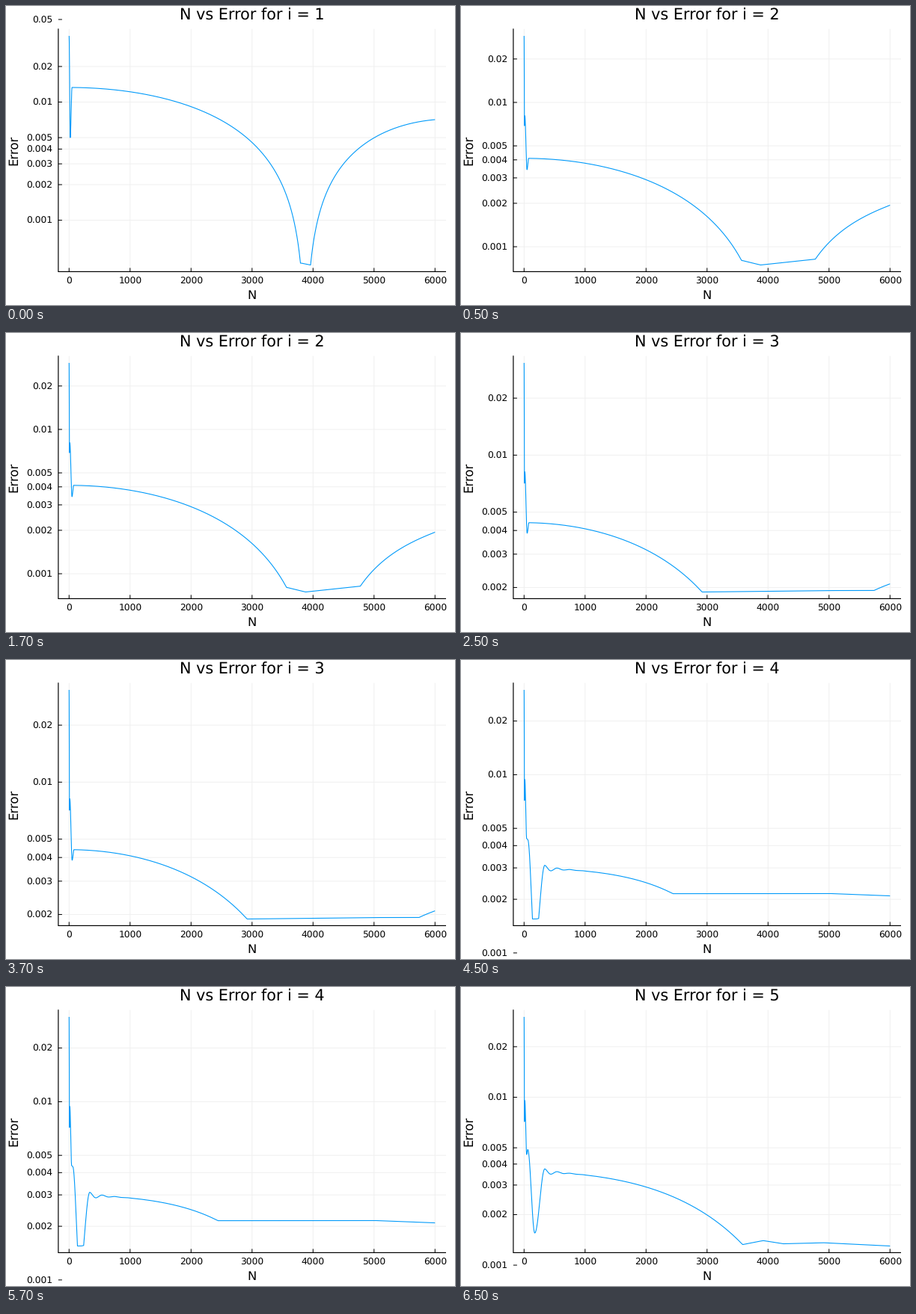
Animation, 600 px wide and 400 px high, one loop 8000 ms. Source, as a matplotlib script:

```python
import matplotlib.pyplot as plt
import numpy as np
from matplotlib.animation import FuncAnimation

WIDTH, HEIGHT, DPI = 600, 400, 100
LEFT, RIGHT, TOP, BOTTOM = 69.9, 588, 30.8, 355.4
X_ZERO, X_SCALE = 84.3, 0.0815
Y_MAX, Y_MIN = 40, 346.5  # heights of the largest and smallest error
TICK = 5
TICK_VALUES = (0.001, 0.002, 0.003, 0.004, 0.005, 0.01, 0.02, 0.05)
BLUE, GRID = "#009afa", "#f0f0f0"

plt.rcParams["font.family"] = "DejaVu Sans"
plt.rcParams["text.hinting"] = "none"

# Key points are (N, error in thousandths):
#   start  - turning points before the curve settles at N = settle
#   trend  - signed error, crossing zero where the curve dips
#   floor  - lower bound that cuts the dip off
SCENES = (
    dict(start=[(0, 36.3), (19, 5)], settle=48, ripple=0,
         trend=[(0, 13.29), (1500, 10.91), (3000, 4.55), (4500, -3), (6000, -7.1)],
         floor=[(3808, 0.433), (3975, 0.416)]),
    dict(start=[(0, 28.9), (6, 6.9), (12, 8.07), (48, 3.42)], settle=75, ripple=0,
         trend=[(0, 4.1), (1500, 3.416), (3000, 1.62), (5000, -1.07), (6000, -1.94)],
         floor=[(3580, 0.802), (3875, 0.747), (4780, 0.819)]),
    dict(start=[(0, 30.7), (6, 7.11), (12, 8.15), (50, 3.87)], settle=80, ripple=0,
         trend=[(0, 4.4), (2000, 3.165), (2920, 1.89), (5740, -1.93), (6000, -2.09)],
         floor=[(2920, 1.893), (5000, 1.927)]),
    dict(start=[(0, 29.9), (6, 7.17), (12, 9.39), (42, 4.38), (60, 4.32), (175, 1.12)],
         settle=340, ripple=0.045,
         trend=[(0, 2.98), (1500, 2.73), (2440, 2.15), (6000, -1)],
         floor=[(200, 1.55), (2440, 2.15), (5000, 2.155), (6000, 2.09)]),
    dict(start=[(0, 30.1), (6, 7.16), (12, 9.55), (42, 4.56), (60, 4.88), (175, 1.555)],
         settle=340, ripple=0.045,
         trend=[(0, 3.6), (2000, 2.92), (3000, 1.99), (3580, 1.33), (6000, -1)],
         floor=[(3580, 1.325), (3920, 1.4), (4240, 1.34), (4900, 1.36), (6000, 1.3)]),
)

N = np.arange(6001)


def eased(n, xs, ys):
    """Half-cosine easing from one turning point to the next."""
    k = np.clip(np.searchsorted(xs, n, side="right") - 1, 0, len(xs) - 2)
    u = np.clip((n - xs[k]) / (xs[k + 1] - xs[k]), 0, 1)
    return ys[k] + (ys[k + 1] - ys[k]) * (1 - np.cos(np.pi * u)) / 2


def error_curve(start, settle, ripple, trend, floor):
    # An even polynomial in N runs through the trend points.
    tx, ty = np.array(trend, float).T
    poly = np.polyfit((tx / 6000) ** 2, ty, len(tx) - 1)
    error = np.abs(np.polyval(poly, (N / 6000) ** 2))

    s = np.maximum(N - settle, 0)
    error *= 1 + ripple * np.exp(-s / 172) * np.cos(2 * np.pi * s / 209)

    sx, sy = np.array(start + [(settle, error[settle])], float).T
    error = np.where(N < settle, np.exp(eased(N, sx, np.log(sy))), error)
    return np.maximum(error, np.interp(N, *zip(*floor))) / 1000


CURVES = [error_curve(**scene) for scene in SCENES]

fig = plt.figure(figsize=(WIDTH / DPI, HEIGHT / DPI), dpi=DPI, facecolor="white")
ax = fig.add_axes([0, 0, 1, 1])


def pt(px):
    return px * 72 / DPI


def line(xs, ys, color="black", width=1.0, z=3):
    ax.plot(xs, ys, color=color, lw=pt(width), zorder=z, snap=False,
            solid_capstyle="butt", solid_joinstyle="round")


def label(x, y, text, size, ha="center", **kw):
    ax.text(x, y, text, fontsize=pt(size), ha=ha, va="baseline", **kw)


def draw_x_axis():
    for n in range(0, 6001, 1000):
        x = X_ZERO + X_SCALE * n
        line([x, x], [TOP, BOTTOM], GRID, z=1)
        line([x, x], [BOTTOM, BOTTOM - TICK])
        label(x, 371.8, str(n), 12.3)
    line([LEFT, RIGHT], [BOTTOM, BOTTOM], width=1.2)
    label(328.8, 392.3, "N", 16.4)


def draw_y_axis(to_y):
    for value in TICK_VALUES:
        y = to_y(value)
        if not 10 < y < 395:
            continue
        if TOP < y < BOTTOM:
            line([LEFT, RIGHT], [y, y], GRID, z=1)
        line([LEFT, LEFT + TICK], [y, y])
        label(62.6, y + 4.6, f"{value:g}", 12.3, ha="right")
    line([LEFT, LEFT], [TOP - 0.5, BOTTOM + 0.5], width=1.2)
    label(15.6, 193.2, "Error", 16.5, rotation=90, rotation_mode="anchor")


def update(frame):
    scene = (frame + 3) // 4
    curve = CURVES[scene]
    high, low = np.log10(curve.max()), np.log10(curve.min())

    def to_y(error):
        return Y_MAX + (Y_MIN - Y_MAX) * (high - np.log10(error)) / (high - low)

    ax.clear()
    ax.set(xlim=(0, WIDTH), ylim=(HEIGHT, 0))
    ax.axis("off")
    draw_x_axis()
    draw_y_axis(to_y)
    label(328.8, 18.5, f"N vs Error for i = {scene + 1}", 20.8)
    line(X_ZERO + X_SCALE * N, to_y(curve), BLUE, 1.1, z=4)
    return []


anim = FuncAnimation(fig, update, frames=16, interval=500,
                     init_func=lambda: [], repeat=True, repeat_delay=0)
plt.show()
```
